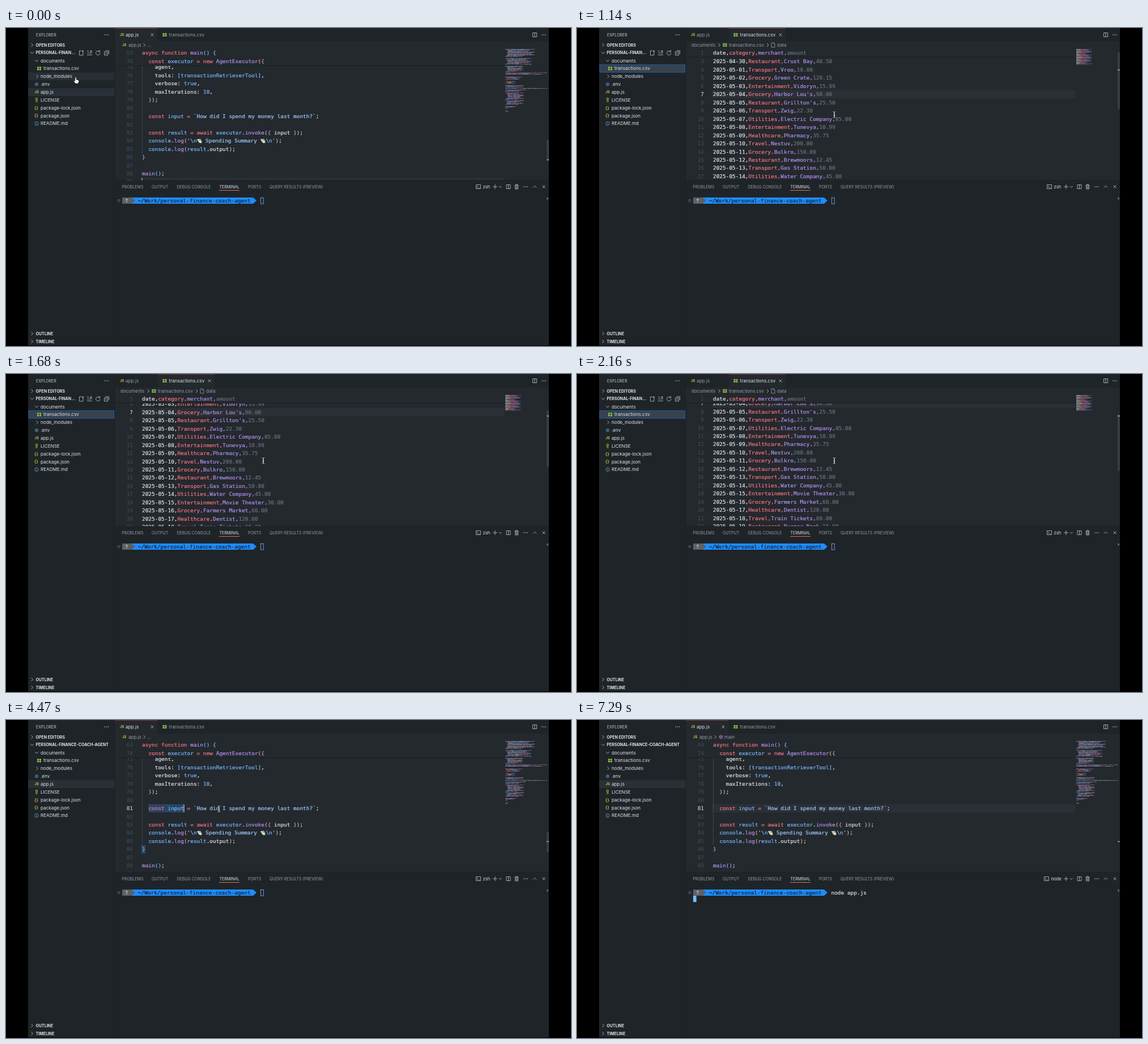
Recreate the animation shown at these times as an HTML page. Size 997 by 561 pixels, loop 8 s.

```html
<!DOCTYPE html>
<html lang="en">
<head>
<meta charset="utf-8">
<title>Code editor session</title>
<style>
html, body { margin: 0; width: 100%; height: 100%; overflow: hidden; background: #000; }
svg { display: block; width: 100%; height: 100%; }
text { white-space: pre; font-family: Inter, "Open Sans", sans-serif; }
.mono { font-family: "DejaVu Sans Mono", "Liberation Mono", monospace; font-size: 9.45px; stroke-width: .2; }
</style>
</head>
<body>
<svg id="stage" viewBox="0 0 997 561"></svg>
<script>
const LOOP = 8000, CH = 5.69, LH = 14.47, LEFT = 240;
const C = {
  w: '#e1e4e8', r: '#f97583', b: '#79b8ff', s: '#9ecbff', p: '#b392f0', o: '#ffab70', g: '#6a737d', k: '#14202c',
  bg: '#24292e', side: '#1f2428', edge: '#1b1f23', dim: '#959da5', icon: '#c3c8cd', line: '#2b3036', sel: '#284566'
};

// Drawing helpers; y is the vertical centre of a text line
const rect = (x, y, w, h, fill, more = '') => `<rect x="${x}" y="${y}" width="${w}" height="${h}" fill="${fill}" ${more}/>`;
const path = (d, stroke = C.icon, more = '') => `<path d="${d}" fill="none" stroke="${stroke}" stroke-width=".8" ${more}/>`;
const label = (x, y, s, fill = C.w, size = 8.1, more = '') =>
  `<text x="${x}" y="${y + size * .36}" font-size="${size}" fill="${fill}" ${more}>${s}</text>`;
const bold = (x, y, s, more = '') => label(x, y, s, C.w, 7, 'font-weight="700" ' + more);
const group = (id, body, more = '') => `<g id="${id}" ${more}>${body}</g>`;
const code = (x, y, marked) => `<text class="mono" x="${x}" y="${y + 3.3}">` +
  marked.split('¦').map(s => `<tspan fill="${C[s[0]]}" stroke="${C[s[0]]}">${s.slice(1)}</tspan>`).join('') + '</text>';
const lineNo = (n, y, fill = '#444d56', id = '') =>
  `<text class="mono" ${id} x="224" y="${y + 3.3}" text-anchor="end" fill="${fill}">${n}</text>`;

const right = (x, y) => path(`M${x - 1.5} ${y - 3}l3 3l-3 3`);
const down = (x, y) => path(`M${x - 3} ${y - 1.5}l3 3l3 -3`);
const close = (x, y) => path(`M${x - 2.5} ${y - 2.5}l5 5m0 -5l-5 5`);
const dots = (x, y) => [-3, 0, 3].map(d => `<circle cx="${x + d}" cy="${y}" r=".8" fill="${C.icon}"/>`).join('');
const split = (x, y) => path(`M${x - 3.5} ${y - 3.5}h7v7h-7zM${x} ${y - 3.5}v7`);
const js = (x, y) => label(x, y, 'JS', '#cbcb41', 6, 'font-weight="700"');
const sheet = (x, y) => rect(x - 3.5, y - 3, 7, 6, '#8dc149') + path(`M${x - 3} ${y}h6M${x} ${y - 3}v6`, C.side);
const braces = (x, y) => label(x, y, '{}', '#cbcb41', 7.5, 'font-weight="600"');
const ring = (x, y, r, stroke) => `<circle cx="${x}" cy="${y}" r="${r}" fill="none" stroke="${stroke}" stroke-width=".9"/>`;

let seed = 7;
const rand = () => (seed = seed * 16807 % 2147483647) / 2147483647;

const rowY = i => 57.6 + i * 13.87;
const rowBox = (id, i, fill) => rect(39, rowY(i) - 6.9, 152, 13.8, fill, `id="${id}"`);

function sidebar() {
  const names = ['documents', 'transactions.csv', 'node_modules', '.env', 'app.js', 'LICENSE',
    'package-lock.json', 'package.json', 'README.md'];
  const y = rowY;
  return rect(39, 0, 152.5, 560, C.side) + label(53, 12, 'EXPLORER', C.icon, 7) + dots(177.5, 12) +
    right(46, 30) + bold(52.5, 30, 'OPEN EDITORS') + down(46, 43.7) +
    group('shortTitle', bold(52.5, 43.7, 'PERSONAL-FINAN...') +
      path('M133 40h-3.500v8h6.500v-5M133.500 41h4M135.500 39v4') +
      path('M143 40.500h3M143 44h9M143 47.500h9M148 41h4M150 39v4') +
      path('M165 41.500a3.700 3.700 0 1 0 1 2.500M165.500 39v3h-3') +
      path('M175.500 40h6v6M173.500 42h6v6h-6zM175 45h3')) +
    group('fullTitle', bold(52.5, 43.7, 'PERSONAL-FINANCE-COACH-AGENT')) +
    rowBox('rowApp', 4, '#2a3037') + rowBox('rowHover', 2, '#282e34') +
    group('rowCsv', rect(40, rowY(1) - 6.6, 150.5, 13.2, '#39414a', 'stroke="#1764b8"')) +
    down(54, y(0)) + sheet(58.5, y(1)) + right(55, y(2)) +
    ring(54, y(3), 2.6, '#519aba') + ring(54, y(3), 1, '#519aba') + js(50.5, y(4)) +
    ring(54, y(5) - 2, 1.7, '#cbcb41') + path(`M53 ${y(5)}v4M55 ${y(5)}v4`, '#cbcb41') +
    braces(50, y(6)) + braces(50, y(7)) +
    ring(54, y(8), 3.2, '#519aba') + path(`M54 ${y(8) - .5}v2.500M54 ${y(8) - 2}v.8`, '#519aba') +
    names.map((n, i) => label(i === 1 ? 66 : 61, y(i), n)).join('') +
    right(46, 539) + bold(52.5, 539, 'OUTLINE') + right(46, 553) + bold(52.5, 553, 'TIMELINE') +
    rect(191, 0, 1, 560, C.edge);
}

// Rows of tiny coloured strokes: blocks of [first line, line count, width]
function minimap(blocks, colors, full) {
  let out = '';
  for (const [first, count, width] of blocks) for (let i = 0; i < count; i++) {
    let x = i && i < count - 1 && !full ? 2 + rand() * 3 : 0;
    const end = width * (i % 4 === 0 ? 1 : .5 + rand() * .5);
    for (let k = 0; x < end; k++) {
      const w = Math.min(end - x, 3 + rand() * 8);
      const c = full ? colors[Math.min(k, 3)] : colors[rand() * colors.length | 0];
      out += rect((881 + x).toFixed(1), (37 + (first + i) * 1.26).toFixed(1), w.toFixed(1), .85, c, 'opacity=".6"');
      x += w + (full ? .2 : .8);
    }
  }
  return out;
}

const appY = n => 83.4 + (n - 76) * LH;
const cash = (x, y) => `<path d="M${x} ${y - 3}l6 -1l3 5l-6 2z" fill="#8fa58c"/>` +
  `<path d="M${x + 3} ${y}l3 -1l3 4l-4 1z" fill="#e6dfc6"/><path d="M${x} ${y - 3}l4 0l-1 4z" fill="#d9d9cf"/>`;

function appPane() {
  const lines = {
    75: '  |wagent,',
    76: '  |wtools: ¦b[transactionRetrieverTool]¦w,',
    77: '  |wverbose: ¦btrue¦w,',
    78: '  |wmaxIterations: ¦b10¦w,',
    79: '|p}¦o)¦w;',
    81: '|rconst ¦binput ¦r= ¦s`How did I spend my money last month?`¦w;',
    83: '|rconst ¦bresult ¦r= await ¦bexecutor¦w.¦pinvoke¦o(¦p{¦w input ¦p}¦o)¦w;',
    84: "|bconsole¦w.¦plog¦o(¦s'¦b\\n",
    85: '|bconsole¦w.¦plog¦o(¦bresult¦w.output¦o)¦w;'
  };
  let text = '';
  for (let n = 75; n < 90; n++) {
    text += lineNo(n, appY(n), undefined, `id="no${n}"`);
    if (lines[n]) {
      const [pad, body] = lines[n].split('|');
      text += code(LEFT + (pad.length + 2) * CH, appY(n), body);
    }
  }
  const y = appY(84);
  text += cash(337, y) + code(346.4, y, 's Spending Summary ') + cash(449, y) + code(458.4, y, "b\\n¦s'¦o)¦w;") +
    code(LEFT, appY(86), 'b}') + code(LEFT, appY(88), 'pmain¦b()¦w;');
  const blocks = [[0, 11, 52], [13, 9, 46], [24, 8, 32], [33, 3, 74], [39, 4, 30], [45, 4, 18], [51, 3, 32],
    [55, 1, 74], [57, 3, 36], [61, 10, 33], [72, 6, 33], [80, 2, 20], [83, 1, 5], [87, 1, 5]];
  return rect(238, 0, 641, LH, C.line, 'id="curLine"') + rect(251.4, appY(81) - 7.2, 0, LH, C.sel, 'id="sel"') +
    rect(239.6, appY(86) - 6.8, 6, 13.6, C.sel, 'id="brace" stroke="#3a6289" stroke-width=".6"') +
    rect(240, 66, .8, 155, '#444d56') + text + rect(0, 0, 1, 13.5, '#e8ebee', 'id="caret"') +
    rect(192, 37, 687, 29, C.bg) + rect(192, 66, 687, 1, C.edge) +
    lineNo(63, 43.7) + code(LEFT, 43.7, 'rasync function ¦pmain¦b() {') +
    lineNo(74, 58.2) + code(LEFT + 2 * CH, 58.2, 'rconst ¦bexecutor ¦r= new ¦pAgentExecutor¦o(¦p{') +
    minimap(blocks, [C.r, C.b, C.s, C.p, C.w]);
}

function csvPane() {
  const rows = `Grocery,Market Hall,52.30 Restaurant,Crust Bay,40.50 Transport,Vroo,18.00 Grocery,Green Crate,120.15
    Entertainment,Vidoryn,15.99 Grocery,Harbor Lou's,90.00 Restaurant,Grillton's,25.50 Transport,Zwig,22.30
    Utilities,Electric Company,85.00 Entertainment,Tunevya,10.99 Healthcare,Pharmacy,35.75 Travel,Nestuv,200.00
    Grocery,Bulkro,150.00 Restaurant,Brewmoors,12.45 Transport,Gas Station,50.00 Utilities,Water Company,45.00
    Entertainment,Movie Theater,30.00 Grocery,Farmers Market,60.00 Healthcare,Dentist,120.00
    Travel,Train Tickets,80.00 Restaurant,Burger Nook,15.00`.split(/(?<=\.\d\d)\s+/);
  const body = rows.map((row, i) => {
    const n = i + 2, y = 44 + (n - 1) * LH, [kind, shop, cost] = row.split(',');
    const date = new Date(Date.UTC(2025, 3, 29 + i)).toISOString().slice(0, 10);
    return (n === 7 ? rect(238, y - 7.2, 641, LH, C.line) : '') + lineNo(n, y, n === 7 ? C.w : undefined) +
      code(LEFT, y, `w${date},¦r${kind},¦p${shop},¦g${cost}`);
  }).join('');
  return `<g clip-path="url(#view)">${group('scroll', body)}</g>` + rect(192, 37, 687, 14, C.bg) +
    rect(192, 51, 687, 1, C.edge) + lineNo(1, 43.7) + code(LEFT, 43.7, 'wdate,¦rcategory,¦pmerchant,¦gamount') +
    minimap([[0, 22, 28]], [C.w, C.r, C.p, C.g], true);
}

const tabTop = (x, w) => rect(x, 0, w, 24, C.bg) + rect(x, 0, w, 1, '#7a3630');

function panel() {
  const tabs = [[204.5, 'PROBLEMS'], [257, 'OUTPUT'], [301.5, 'DEBUG CONSOLE'], [376.5, 'TERMINAL'], [427, 'PORTS'],
    [465, 'QUERY RESULTS (PREVIEW)']];
  const shell = (id, x, name) => group(id, path(`M${x} 276.500h8v7h-8zM${x + 1.5} 278.500l2 1.700l-2 1.700M${x + 4.5} 282h2`) +
    label(x + 12, 280, name, C.w, 7.6));
  return rect(192, 269, 766, 291, C.side) + rect(192, 268.5, 766, .8, C.edge) +
    tabs.map(([x, s]) => label(x, 280, s, s === 'TERMINAL' ? C.w : C.dim, 7)).join('') +
    rect(376, 286, 36, 1, '#d9745f') + shell('zsh', 829.5, 'zsh') + shell('node', 824.5, 'node') +
    path('M859 280h8M863 276v8') + path('M870 279l2.300 2.300l2.300 -2.300') + split(886.5, 280) +
    path('M897.500 277.500h7M899.500 277.500v-1.500h3v1.500M898.500 277.500v6.500h5v-6.500M900.300 279v4M901.900 279v4') +
    dots(917, 280) + path('M930 281.500l3 -3l3 3') + close(949, 280) +
    rect(954, 299, 3, 3.5, '#5a6067') + ring(199, 304.5, 2, '#6a737d') +
    '<path d="M221 299H436L442 304.500L436 310H221z" fill="#1e8cff"/>' +
    '<path d="M205 299H222L228 304.500L222 310H205z" fill="#5b6067"/>' +
    path('M213 308v-6.500M210.700 303.500l2.300 -2.300l2.300 2.300', '#e1e4e8') +
    code(232.8, 304.4, 'k~/Work/personal-finance-coach-agent') +
    rect(449.5, 299.3, 4.8, 10.8, 'none', 'id="hollow" stroke="#79b8ff" stroke-width=".8"') +
    rect(449, 299, 5.7, 11.2, C.b, 'id="block"') + group('command', code(448.5, 304.5, 'wnode app.js'));
}

const stage = document.getElementById('stage');
const beam = 'M-2.500 -5.500q2.500 0 2.500 1.500v8q0 1.500 -2.500 1.500M2.500 -5.500q-2.500 0 -2.500 1.500v8q0 1.500 2.500 1.500M-1.500 1h3';
stage.innerHTML = '<defs><clipPath id="view"><rect x="192" y="37" width="766" height="232"/></clipPath></defs>' +
  rect(0, 0, 997, 561, '#000') + rect(192, 0, 766, 24, C.side) + rect(192, 24, 766, 245, C.bg) + sidebar() +
  group('app', tabTop(192, 75) + close(258, 12) + js(205, 30) + label(216, 30, 'app.js', C.dim, 8) + right(244, 30) +
    group('crumbDots', label(249, 30, '...', C.dim, 8)) +
    group('crumbMain', path('M254 27l2.700 1.300v3.400l-2.700 1.300l-2.700 -1.300v-3.400zM251.300 28.300l2.700 1.400l2.700 -1.400M254 29.700v3.300', C.p) +
      label(260, 30, 'main', C.dim, 8)) + `<g clip-path="url(#view)">${appPane()}</g>`) +
  group('csv', tabTop(268, 100) + close(359, 12) + label(202, 30, 'documents', C.dim, 8) + right(251, 30) +
    sheet(261, 30) + label(268, 30, 'transactions.csv', C.dim, 8) + right(336.5, 30) +
    path('M343 26h4l2 2v6h-6zM347 26v2h2', C.dim) + label(353, 30, 'data', C.dim, 8) + csvPane()) +
  js(201, 12) + label(211, 12, 'app.js', C.w, 8.2, 'id="tabApp"') + sheet(280, 12) +
  label(287.5, 12, 'transactions.csv', C.w, 8.1, 'id="tabCsv"') + split(933, 12) + dots(949, 12) +
  rect(954, 0, 4, 36, '#383e44', 'id="thumb"') + rect(954, 0, 4, 1.3, '#b4b8bc', 'id="mark"') + panel() +
  group('hand', '<path d="M-1.200 .5q1.200 -1.500 2.400 0v3.500l3 .8q1.700 .6 1.300 2.700l-1 3.500h-5l-3 -4q-.5 -1.500 1 -1.200l1.300 1z" fill="#fff" stroke="#111" stroke-width=".7"/>') +
  group('ibeam', path(beam, '#000', 'style="stroke-width:2.2"') + path(beam, '#fff'));

const el = {};
stage.querySelectorAll('[id]').forEach(e => el[e.id] = e);
const show = (id, on) => el[id].setAttribute('visibility', on ? 'inherit' : 'hidden');
const set = (id, attrs) => { for (const k in attrs) el[id].setAttribute(k, attrs[k]); };
const smooth = u => u * u * (3 - 2 * u);

function track(keys, t, ease = u => u) {
  const i = keys.findIndex(k => k[0] > t);
  if (i < 0) return keys[keys.length - 1].slice(1);
  if (!i) return keys[0].slice(1);
  const a = keys[i - 1], b = keys[i], u = ease((t - a[0]) / (b[0] - a[0]));
  return a.slice(1).map((v, k) => v + (b[k + 1] - v) * u);
}

const pointerKeys = [[0, 123, 87], [420, 104, 71], [600, 104, 71], [1080, 454, 153], [2460, 454, 153], [3080, 206, 15],
  [3240, 206, 15], [4050, 251, 157], [4340, 251, 157], [4578, 468, 157], [4950, 468, 157], [5100, 661, 157],
  [5250, 661, 157], [6030, 480, 318]];
const scrollKeys = [[1080, 0], [1140, 13.7], [1300, 40], [1450, 54], [1680, 63.4], [2160, 79], [2430, 81]];
const pointer = t => track(pointerKeys, t, smooth);

function draw(t) {
  const csv = t >= 480 && t < 3120, clicked = t >= 4290, focused = t < 6300;
  const [px, py] = pointer(t), [scroll] = track(scrollKeys, t);
  show('csv', csv);
  show('app', !csv);
  set('tabApp', { fill: csv ? C.dim : C.w });
  set('tabCsv', { fill: csv ? C.w : C.dim });

  show('shortTitle', t < 3120);
  show('fullTitle', t >= 3120);
  show('rowApp', !csv);
  show('rowCsv', csv);
  const row = Math.floor((py - 50.7) / 13.87);
  show('rowHover', px < 191 && row >= 0 && row < 9 && !(csv && row === 1));
  set('rowHover', { y: rowY(row) - 6.9 });

  set('scroll', { transform: `translate(0 ${-scroll})` });
  show('thumb', t < 5900);
  set('thumb', csv ? { y: 37 + scroll * .43, height: 100 } : { y: 197, height: 36 });
  set('mark', { y: csv ? 73.5 : clicked ? 213.8 : 232 });

  // The selection trails the pointer slightly and snaps to characters
  const col = clicked ? Math.max(2, Math.min(55, Math.round((pointer(t - 48)[0] - LEFT) / CH))) : 0;
  const selecting = t >= 4340 && t < 5280 && col > 2;
  const endCol = t >= 5280 ? 55 : col;
  const cur = clicked ? 81 : 89;
  show('sel', selecting);
  set('sel', { width: Math.max(0, (col - 2) * CH) });
  show('curLine', !csv && !selecting);
  set('curLine', { y: appY(cur) - 7.2 });
  set('no81', { fill: clicked ? C.w : '#444d56' });
  set('no89', { fill: clicked ? '#444d56' : C.w });
  const blinkFrom = t >= 5280 ? 5280 : clicked ? 4290 : csv || t < 480 ? 0 : 3120;
  show('caret', !csv && focused && (selecting || (t - blinkFrom) % 1000 < 500));
  set('caret', { x: LEFT + endCol * CH - .5, y: appY(cur) - 6.8 });
  show('brace', !csv && clicked && (t < 4620 || t >= 5310) && focused);
  show('crumbMain', !csv && t >= 4770);
  show('crumbDots', !csv && t < 4770);

  const ran = t >= 7200;
  show('hollow', focused);
  show('block', ran || (!focused && t < 6525));
  set('block', ran ? { x: 205, y: 310 } : { x: 449, y: 299 });
  show('command', t >= 6870);
  show('zsh', t < 7260);
  show('node', t >= 7260);

  const hand = px < 192 || py < 37;
  show('hand', hand);
  show('ibeam', !hand && t < 6885);
  set(hand ? 'hand' : 'ibeam', { transform: `translate(${px} ${py})` });
}

function frame() {
  draw(performance.now() % LOOP);
  requestAnimationFrame(frame);
}
frame();
</script>
</body>
</html>
```
